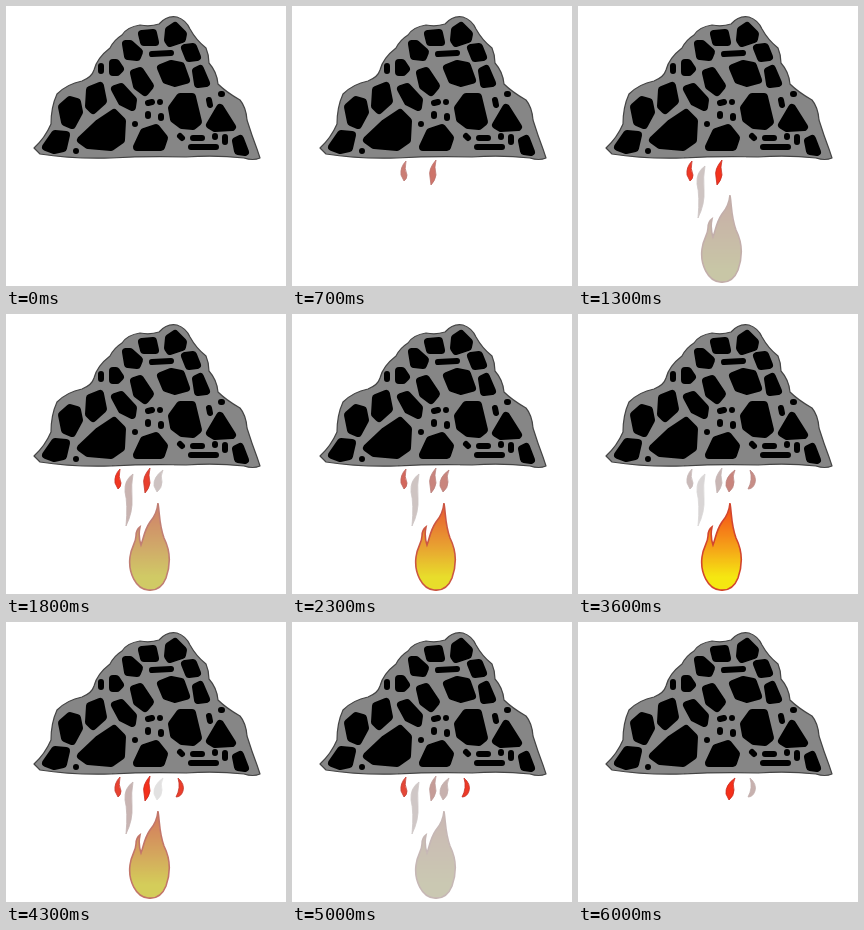
Write an HTML page that moves like this. It is 280 px wide and 280 px high and loops after 6100 ms.

```html
<!DOCTYPE html>
<html lang="en">
<head>
<meta charset="utf-8">
<title>Burning rock</title>
<style>
  html, body { margin: 0; height: 100%; overflow: hidden; background: #fff; }
  svg { display: block; width: 100%; height: 100%; }
  #stones { stroke: #000; stroke-width: 8; stroke-linejoin: round; stroke-linecap: round; }
  .flame { opacity: 0; fill: #f5301a; stroke: #c8281c; stroke-width: .8; }
  #big { fill: url(#fire); stroke: #d83a20; stroke-width: 1.6; }
</style>
</head>
<body>
<svg viewBox="0 0 280 280">
  <linearGradient id="fire" x1="0" y1="0" x2="0" y2="1">
    <stop offset="0" stop-color="#ff3a08"/>
    <stop offset=".5" stop-color="#ffa008"/>
    <stop offset=".85" stop-color="#fff000"/>
  </linearGradient>

  <path fill="#868686" stroke="#444" stroke-width="1.2" stroke-linejoin="round"
    d="M28 142Q39 132 45 118Q45 101 51 88Q61 78 76 75Q86 71 88 64Q91 52 104 42Q108 34 116 29Q121 21 134 19Q144 21 153 18Q161 9 171 11Q180 14 184 23Q190 34 200 42Q203 49 203 57Q211 66 212 78Q220 86 234 94Q240 101 241 114Q246 130 251 143L254 152Q247 155 238 152Q210 149 180 151Q140 150 105 152Q65 153 34 148Z"/>

  <g id="stones">
    <path d="M162 34L163 24 169 20 177 28 176 33 164 37ZM136 28L147 27 149 36 138 36ZM120 38L124 38 133 46 131 51 122 50ZM179 42L187 41 191 51 183 52ZM155 62L165 58 175 60 180 74 169 77 160 74ZM128 67L134 65 144 80 139 86 131 80ZM190 65L194 63 200 77 192 78ZM107 57L110 57 114 63 111 66 107 66Z"/>
    <path d="M84 84L94 80 97 95 87 104 83 100ZM56 101L64 94 71 96 73 106 66 119 59 116ZM109 83L115 81 127 94 126 101 116 96ZM75 134L93 117 108 107 116 115 115 134 105 141 82 139ZM40 141L49 128 60 129 57 142 48 144ZM131 141L138 126 150 122 158 132 155 141ZM166 102L174 91 186 91 192 116 187 120 176 119 168 113ZM204 119L214 102 226 121 209 122ZM230 135L234 133 239 146 232 145Z"/>
    <path stroke-width="6" d="M146 48l19-1M185 141h25M142 97l4-1M154 96h0M142 108v2M155 110v2M129 118h0M174 130l2 2M187 132h9M203 94l1 5M215 88h1M95 60v5M70 145h0M209 130v1M219 131v5"/>
  </g>

  <path class="flame" id="left" d="M114 155Q108 161 109 169L112 175Q115 173 115 169Q112 163 114 155Z"/>
  <path class="flame" id="middle" d="M144 154Q136 163 138 171L139 179Q143 175 144 169Q142 161 144 154Z"/>
  <path class="flame" id="right" d="M157 156Q147 163 148 172L151 178Q156 174 156 168Q154 162 157 156Z"/>
  <path class="flame" id="edge" d="M172 156Q179 162 177 169Q175 175 170 175Q175 166 172 156Z"/>
  <path class="flame" id="streak" d="M127 160Q118 166 119 178Q122 190 120 212Q127 198 126 184Q125 170 127 160Z"/>
  <path class="flame" id="big" d="M152 189C154 202 153 210 158 224C164 236 165 250 160 264C156 274 150 277 142 276C130 275 122 259 124 243C125 233 130 229 130 222Q130 216 134 213Q132 222 135 231C138 223 138 217 144 208Q151 200 152 189Z"/>
</svg>
<script>
  const LOOP = 6100, STEP = 100;

  // Each pulse swells from start to end, up to its peak
  const pulses = {
    left: [{ start: 0, end: 3150 }, { start: 3350, end: 5900 }],
    middle: [{ start: 0, end: 2900 }, { start: 3400, end: 5300 }],
    right: [{ start: 1500, end: 4400, peak: .7 }, { start: 4700, end: 7300 }],
    edge: [{ start: 2950, end: 6400 }],
    streak: [{ start: 800, end: 2800, peak: .2 }, { start: 3300, end: 5500, peak: .2 }],
    big: [{ start: 700, end: 5500 }]
  };

  function pulseAt(time, { start, end, peak = 1 }) {
    if (time <= start || time >= end) return 0;
    return peak * Math.sin(Math.PI * (time - start) / (end - start)) ** 1.5;
  }

  function draw() {
    const time = Math.floor(performance.now() % LOOP / STEP) * STEP;
    for (const id in pulses) {
      const strength = Math.max(...pulses[id].map(pulse => pulseAt(time, pulse)));
      const { style } = document.getElementById(id);
      // Weak flames are both see-through and grey
      style.opacity = strength ** .4;
      style.filter = `contrast(${strength})`;
    }
    requestAnimationFrame(draw);
  }
  draw();
</script>
</body>
</html>
```
